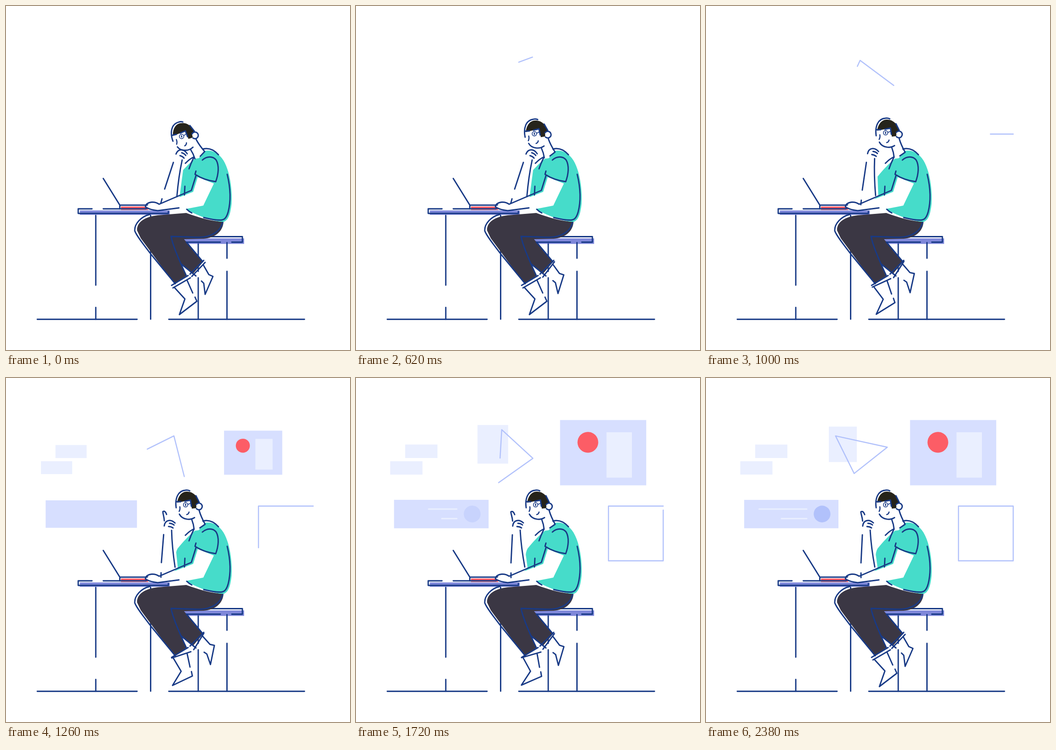
An HTML page for the animation above (2.4 s loop, 748 px wide and 748 px high).

```html
<!DOCTYPE html>
<html lang="en">
<head>
<meta charset="utf-8">
<title>Working at the desk</title>
<style>
  html, body { margin: 0; width: 100%; height: 100%; overflow: hidden; background: #fff; }
  svg { display: block; width: 100vw; height: 100vh; }
  .ink { fill: none; stroke: #183a86; stroke-width: 2.9; stroke-linecap: round; stroke-linejoin: round; }
  .thin { fill: none; stroke: #b1c1fb; stroke-width: 2.4; stroke-linecap: round; stroke-linejoin: round; }
  .pale { fill: #eaefff; }
  .mid { fill: #d7dfff; }
  .red { fill: #fc5d66; }
  .purple { fill: #7f88da; }
  .teal { fill: #46dcca; }
  .dark { fill: #3b3744; }
  .white { fill: #fff; }
</style>
</head>
<body>
<svg viewBox="0 0 748 748">
  <!-- wall -->
  <g id="notes" class="pale">
    <rect x="107" y="144.7" width="70" height="29.3"/>
    <rect x="74.5" y="181" width="70" height="29"/>
  </g>
  <g id="card">
    <rect class="mid" x="83" y="265" width="205" height="61.7"/>
    <g fill="none" stroke="#eaefff" stroke-width="3" stroke-linecap="round">
      <path id="row1"/><path id="row2"/>
    </g>
    <circle id="dot" cx="252.4" cy="295.7" r="18.2" fill="#b1c1fb"/>
  </g>
  <g id="tile"><rect class="pale" x="267" y="105.7" width="61" height="77"/></g>
  <g id="poster">
    <rect class="mid" x="443.7" y="91.4" width="187.4" height="142"/>
    <circle class="red" cx="504.2" cy="139.8" r="22.6"/>
    <rect class="pale" x="544.7" y="118" width="55.3" height="98.7"/>
  </g>
  <path id="tri" class="thin" pathLength="100" d="M-66.3 20.5L22.7 40.5L23.7 -51.5Z"/>
  <path id="box" class="thin" pathLength="100" d="M668 278.5H549V397.5H668Z"/>

  <!-- furniture -->
  <rect class="purple" x="160.5" y="444.5" width="195.5" height="9.5"/>
  <rect class="purple" x="385" y="505.3" width="132.7" height="12"/>
  <rect class="red" x="250" y="436" width="59" height="7.5"/>
  <g class="ink">
    <path d="M68 681.3H285M354 681.3H649"/>
    <path d="M195.2 455.5V607M195.2 655.5V681M314.5 455.5V681"/>
    <path d="M418 517V577M418 591V681M480.5 514.5V548.5M480.5 577V681"/>
    <path d="M187 441H157V451H353V447M211.5 441H305"/>
    <path d="M211.5 375L247.5 433H316M247.5 433V441"/>
    <path d="M443 501.5H514V513.5H491M466 513.5H390"/>
  </g>

  <!-- body -->
  <path class="dark" d="M285 488C284 470 302 458 330 455L392 450C420 460 445 468 473 469C472 490 455 504 430 506L387 507L429 556L406 583L381 561L393 586L367 605L293 505Z"/>
  <path class="teal" d="M433 315C445 312 462 318 473 336C490 365 492 410 490.5 430C488 452 484 467 472 469.5C450 468 420 458 392 442L362 424L372 414C367 395 368 380 373 371C385 356 398 342 411 332L419 331Z"/>
  <g id="armFill"><path class="white" d="M341 325L362 331L373 412L350 430L337 430Z"/></g>
  <path class="white" d="M305 437L313 428L333 433L407 404L417 372L452 386L429 434L393 441L330 445Z"/>
  <g class="ink">
    <path d="M313 453C293 458 279 474 280 489C284 500 300 520 317 542L368 604"/>
    <path d="M471 471C466 490 448 502 420 503L359 501C362 518 375 550 392 586"/>
    <path d="M392 513L428 556M381 561L413 587"/>
    <path d="M360 607.5L396 586M400 583L430 553"/>
    <path d="M428 311C440 308 452 312 462 323.5"/>
    <path d="M427 335C437 326 450 326 457 335C464 347 462 366 456 382C440 380 425 375 411 366L413 359"/>
    <path d="M481 366C488 395 489 425 483 448C479 462 474 465 468 465.5C455 466 442 463 430 460"/>
    <path d="M393 442Q398 447 404 450M390 342Q400 332 408 328.5M408 330Q402 342 398 354M389 392L388 411"/>
    <path d="M413 369L403 401L333 431Q326 426 317 426.5Q304 428 303 437Q312 443 330 445L376 439"/>
  </g>

  <g id="foot1" class="ink">
    <path d="M363 613L401 591M367 613L389 637L377 671L415 642L411 633M394 597L406 624"/>
  </g>
  <g id="foot2" class="ink">
    <path d="M404 588L433 557.5M429 563L441 584L450 588L433 627L430 603L425 598"/>
  </g>

  <g id="arm" class="ink">
    <path d="M340 341L337 402M337 424V434M357 331Q359 368 367 411"/>
    <path d="M340.7 322C342 309 354 306 364 315M352 316Q358 316 362 319.5M350 323Q356 323 360 326"/>
    <path id="finger" pathLength="100" d="M340.5 311C340 302 337 297 336.7 291Q342 288 345 297"/>
  </g>

  <g id="head" class="ink">
    <path d="M372 271C375 254 384 247 393 247C407 247 417 257 420 272L413 283L404 284L402 267L388 268Z" fill="#26241b" stroke="none"/>
    <path d="M370 282C367 262 374 245 390 244Q395 243 399.5 245.3M413 256L420 270"/>
    <path d="M371 269H380M389 268L401 265.5L403 279"/>
    <circle cx="390.5" cy="275.7" r="4.8" stroke-width="1.6"/>
    <ellipse cx="390.5" cy="275.7" rx="0.8" ry="2" stroke-width="1.4"/>
    <path d="M395.5 275L402 272" stroke-width="1.6"/>
    <path d="M378 280Q379 286 376.5 290M393 297Q397 296 398 291.5" stroke-width="2.5"/>
    <path d="M377 296C383 308 400 310 410 303.5"/>
    <path d="M413.7 275A7.2 7.2 0 1 1 414 284" fill="#fff"/>
    <path d="M420 288Q424 302 433 318L421.5 326M404 308Q408 318 409 329"/>
  </g>
</svg>
<script>
  const LOOP = 2400;
  const el = {};
  document.querySelectorAll('[id]').forEach(n => el[n.id] = n);

  const ramp = (t, a, b) => Math.min(1, Math.max(0, (t - a) / (b - a)));
  const ease = (t, a, b) => { const s = ramp(t, a, b); return s * s * (3 - 2 * s); };
  const swing = (t, a, peak, b) => ease(t, a, peak) - ease(t, peak, b);

  // fast growth, then a damped wobble around full size
  function pop(t, start) {
    const rise = 283, s = (t - start - rise) / 1000;
    if (s < 0) return ramp(t, start, start + rise) ** 3;
    return 1 + 0.17 * Math.sin(s * 6 * Math.PI) * Math.exp(-8 * s);
  }

  const set = (n, v) => n.setAttribute('transform', v);
  const turn = (n, deg, x, y) => set(n, `rotate(${deg} ${x} ${y})`);

  function scale(n, k, x, y) {
    n.style.display = k > 0 ? '' : 'none';
    set(n, `translate(${x} ${y}) scale(${k}) translate(${-x} ${-y})`);
  }

  function trace(n, p) {
    n.style.display = p > 0 ? '' : 'none';
    n.setAttribute('stroke-dasharray', p < 1 ? `${p * 100} 300` : 'none');
  }

  function row(n, y, full, p) {
    n.style.display = p > 0 ? '' : 'none';
    n.setAttribute('d', `M219 ${y}H${219 - full * p}`);
  }

  function draw(t) {
    turn(el.head, -11.7 * (1 - ease(t, 0, 960)), 425, 322);

    const lift = 15.3 * (1 - ramp(t, 620, 1620)) ** 2.1;
    turn(el.arm, lift, 355.7, 429.8);
    turn(el.armFill, lift, 355.7, 429.8);
    trace(el.finger, ease(t, 1040, 1220));

    turn(el.foot1, 15.8 * swing(t, 640, 1560, 2290), 381.5, 598);
    turn(el.foot2, -12 * swing(t, 0, 1200, 2400), 419.5, 569.5);

    set(el.tri, `translate(339.3 164.5) rotate(${0.15 * (t - 2040)})`);
    trace(el.tri, ramp(t, 456, 1996));
    trace(el.box, ease(t, 800, 1800));

    scale(el.notes, pop(t, 980), 126, 177.3);
    scale(el.card, pop(t, 980), 185.5, 296);
    scale(el.tile, pop(t, 1360), 297.5, 144.2);
    scale(el.poster, ease(t, 1000, 1420), 537.4, 162.4);

    const rows = ease(t, 1440, 1940);
    row(el.row1, 285, 103.5, rows);
    row(el.row2, 305.8, 55, rows);
    el.dot.setAttribute('opacity', ramp(t, 1600, 1900));
  }

  let start;
  function tick(now) {
    start ??= now;
    draw((now - start) % LOOP);
    requestAnimationFrame(tick);
  }
  draw(0);
  requestAnimationFrame(tick);
</script>
</body>
</html>
```
